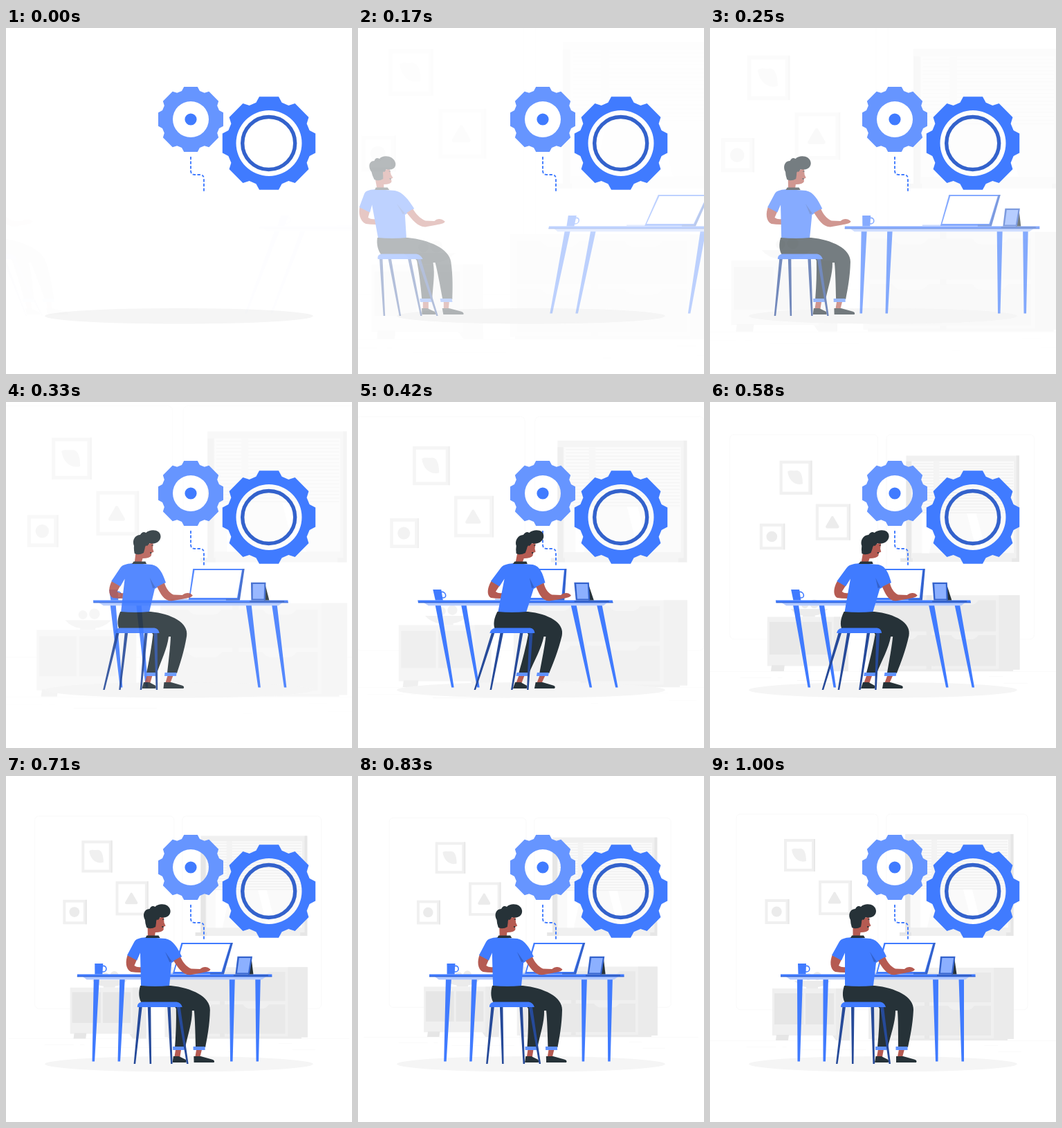
Animation of 500x500 px, one loop 1040 ms. Source, as an HTML page:

```html
<!DOCTYPE html>
<html lang="en">
<head>
<meta charset="utf-8">
<title>Man at a desk</title>
<style>
html, body { margin: 0; width: 100%; height: 100%; overflow: hidden; background: #fff; }
svg { display: block; width: 100%; height: 100%; }
</style>
</head>
<body>
<svg viewBox="0 0 500 500">
  <g id="room" opacity="0">
    <g fill="#ebebeb">
      <path d="M0 382.4h500v.25H0zM416.8 398.5h33.1v.25h-33.1zM322.5 401.2h8.7v.25h-8.7zM396.6 389.2h19.2v.25h-19.2zM52.5 390.9h43.2v.25H52.5zM104.6 390.9h6.3v.25h-6.3zM131.5 395.1h93.7v.25h-93.7z"/>
    </g>
    <g fill="none" stroke="#ebebeb" stroke-width=".3">
      <rect x="38.2" y="55" width="204.5" height="282.8" rx="5.7"/>
      <rect x="254.8" y="55" width="204.2" height="282.8" rx="5.7"/>
    </g>
    <g id="pictures"></g>
    <g fill="#ebebeb">
      <path d="M130 105c8-1 9 10 8 19-10 2-19-6-19-19 4-2 8 0 11 0z" transform="rotate(-6 129 114)" fill="#f0f0f0"/>
      <path d="M178.500 168.500q1.500-2 3 0l7.500 13q1 3-2 3h-14q-3 0-2-3z"/>
      <circle cx="96.300" cy="196" r="7.500"/>
    </g>

    <path fill="#f0f0f0" d="M282 84h156.500v147H282z"/>
    <path fill="#e6e6e6" d="M434.500 84h4v147h-4zM282 92h7v134h-7zM274 226h17v5h-17zM428 226h10.500v5H428z"/>
    <path fill="#fafafa" d="M290 92h141v127H290z"/>
    <path fill="#fff" d="M366 164h13l14 55h-13zM304 164h22l-12 55h-10z"/>
    <g id="blinds" stroke="#f0f0f0" stroke-width="1.300"></g>
    <path fill="#f3f3f3" d="M320 92h8v72h-8z"/>

    <path fill="#f0f0f0" d="M229 277h210v103H229z"/>
    <path fill="#ebebeb" d="M410 277h29v103h-29zM234 379h196v3H234z"/>
    <path fill="#e8e8e8" d="M310 277h7v103h-7z"/>
    <g id="drawers"></g>

    <path fill="#f0f0f0" d="M90 307h112v68H90z"/>
    <path fill="#ebebeb" d="M182 307h20v75h-20zM177 375h5v7z"/>
    <path fill="#e6e6e6" d="M93 314h42v45H93zM138 314h41v45h-41zM96 374h18l-1 8H95z"/>
    <g fill="#ebebeb">
      <circle cx="142" cy="290" r="5"/><circle cx="155" cy="289" r="6"/>
      <path d="M122 296h52q-8 8-18 9v2h-17v-2q-10-1-17-9z"/>
    </g>
  </g>

  <ellipse cx="250" cy="416.240" rx="193.900" ry="11.300" fill="#f5f5f5"/>

  <g fill-rule="evenodd">
    <path id="smallGear" fill="#6695ff" transform="translate(267 132)"/>
    <circle cx="267" cy="132" r="8.600" fill="#407bff"/>
    <path id="bigGear" fill="#407bff" transform="translate(380 166.500) scale(1.430)"/>
    <circle cx="379.700" cy="166.500" r="38" fill="none" stroke="#3362cc" stroke-width="5.400"/>
  </g>
  <path d="M267 186v20q0 6 6 6h7q6 0 6 6v18" fill="none" stroke="#407bff" stroke-width="1.900" stroke-dasharray="4.200 2.400"/>

  <g id="desk" fill="#407bff" opacity="0">
    <path d="M126 293h8l-4 119.500h-3.500zM163.500 293h7.500l-4 119.500h-3.500zM322 293h8l-.5 119.500H326zM359.500 293h7.500v119.500h-3.500z"/>
    <path fill="#b3caff" d="M110 290h265l-6 4.300H116z"/>
    <path d="M102 286.500h281.500v3.800H102z"/>
    <path fill="#3362cc" d="M102 289.300h281.500v1H102zM328 287h50v3h-50z"/>
    <path d="M127 271h12l-.5 15.500h-11z"/>
    <circle cx="139.500" cy="278.700" r="4.300" fill="none" stroke="#407bff" stroke-width="1.600"/>
    <path fill="#a6c1ff" d="M214 284.600h82v1.900h-82z"/>
    <path d="M251.500 241H324l-12 45h-72z"/>
    <path fill="#3362cc" d="M323 241h3l-12 45.500h-20v-2h17z"/>
    <path fill="#fff" d="M253.500 243H322l-11.500 40h-68z"/>
    <path fill="#263238" d="M353 262l3.500 24.500H349z"/>
    <path fill="#3362cc" d="M333 260.800h21.500l-3.500 25.700h-20.500z"/>
    <path fill="#8cb0ff" d="M335.500 263h16.500l-3 21.500h-16z"/>
  </g>

  <g id="man" opacity="0">
    <g fill="#b55b52">
      <path d="M177 258c-4 9-4 21 4 25q6 1 15 1v-8q-6 1-10-2l5-11z"/>
      <path d="M243 395h8l-2 11h-8zM273 395h8l-3 11h-7z"/>
      <path d="M217 207l13-4 .5 9 2 4.500-3 1.500v4q-2 4-12 4l-1 6h-10v-15z"/>
    </g>
    <path fill="#263238" d="M205 219q-2-6-2-11c-4-7-1-16 7-16q3-6 8-3c6-6 21-5 22 6 0 8-8 11-15 9l-3 4q-3-2-3 4l-1 6q-5 3-10 2zM228 207l2.500-.8v1.300l-2 .6zM227 217l2.500 0-.4 2h-1.500z"/>
    <path fill="#263238" d="M194 303h44c30 3 57 16 56 35-1 22-5 40-8 54h-14c0-23 0-39-1-53h-3c0 17-7 35-11 53h-15q3-30 3-56-3-5-9-6l-40-1c-5-7-5-17-2-26z"/>
    <path fill="#407bff" d="M204 233c-10 1-15 2-18 8l-10 18 14 7.500 5-11v47.500q20 2 41 0l4-33 15-9c-6-13-12-24-23-26z"/>
    <path fill="#263238" d="M205 230.500h17l2 3.500h-21z"/>
    <path fill="#3362cc" d="M231 254l9.500 14-3.500 1z"/>
    <path fill="#b55b52" d="M243 267c6 10 12 20 23 20.500l17-3c5-1 12-2 13-5-5-5-11-4-15-.5l-13-.5c-7-3-12-10-15-17z"/>
    <path fill="#5f91ff" d="M239 391h17l-.5 5H239zM268.500 391h17v5h-17z"/>
    <path fill="#263238" d="M238 414l1.500-9h8l10 5q1.500 4-.5 4zM269 414v-9h10l16 4.500q5 1.500 3 4.500z"/>
    <path fill="#264a99" d="M191.500 333h4.500l-11.500 83h-2.500zM204 333h4.500l-1 83h-2.500zM232.500 333h4.500l1 83h-2.500zM246 333h5l10 83h-2.500z"/>
    <path fill="#407bff" d="M189 334q0-7 7-7.500h50q6 .5 8 7.500z"/>
  </g>
</svg>
<script>
const $ = id => document.getElementById(id);
const rect = (x, y, w, h, fill) => `<rect x="${x}" y="${y}" width="${w}" height="${h}" fill="${fill}"/>`;

$('pictures').innerHTML = [[107, 91, 45, 47], [157, 151, 48, 50], [79.5, 178, 35, 36]]
  .map(([x, y, w, h]) => rect(x, y, w, h, '#f0f0f0') + rect(x + w - 2, y, 2, h, '#e8e8e8') +
    rect(x + 4, y + 4, w - 9, h - 8, '#fff')).join('');

$('blinds').innerHTML = Array.from({ length: 18 },
  (_, i) => `<path d="M292 ${95 + i * 4}H430"/>`).join('');

$('drawers').innerHTML = [[236, 284], [320, 284], [236, 332], [320, 332]]
  .map(([x, y]) => `<path fill="#e9e9e9" d="M${x} ${y}h24q4 6 10 6h18q6 0 10-6h24v43h-86z"/>`).join('');

// Eight flat teeth around a round hole
function gear(hole) {
  const points = [];
  for (let i = 0; i < 8; i++) {
    const c = Math.cos(i * Math.PI / 4), s = Math.sin(i * Math.PI / 4);
    for (const [x, y] of [[-13, -41], [-9.8, -47], [9.8, -47], [13, -41]])
      points.push(`${x * c - y * s} ${x * s + y * c}`);
  }
  const arc = `a${hole} ${hole} 0 1 0 `;
  return `M${points.join('L')}ZM${-hole} 0${arc}${2 * hole} 0${arc}${-2 * hole} 0Z`;
}
$('smallGear').setAttribute('d', gear(26));
$('bigGear').setAttribute('d', gear(33.2));

// cubic-bezier(.36, -.01, .5, 1.38)
function ease(x) {
  if (x <= 0 || x >= 1) return x <= 0 ? 0 : 1;
  const curve = (s, a, b) => 3 * (1 - s) ** 2 * s * a + 3 * (1 - s) * s * s * b + s ** 3;
  let lo = 0, hi = 1;
  for (let i = 0; i < 30; i++) {
    const mid = (lo + hi) / 2;
    if (curve(mid, .36, .5) < x) lo = mid; else hi = mid;
  }
  return curve(lo, -.01, 1.38);
}

function show(id, transform, opacity) {
  $(id).setAttribute('transform', transform);
  $(id).setAttribute('opacity', Math.max(0, Math.min(1, opacity)));
}

const stops = [0, .6, .8, 1];
const slants = [20, -10, 2, 0].map(deg => Math.tan(deg * Math.PI / 180));

// Slide in from one side (-1 left, 1 right), slanting about height cy
function slideIn(id, p, side, cy) {
  const i = p < .6 ? 0 : p < .8 ? 1 : 2;
  const k = ease((p - stops[i]) / (stops[i + 1] - stops[i]));
  const slant = -side * (slants[i] + (slants[i + 1] - slants[i]) * k);
  const shift = i ? 0 : side * 250 * (1 - k);
  show(id, `matrix(1 0 ${slant} 1 ${shift - slant * cy} 0)`, i ? 1 : k);
}

function draw() {
  // Motion steps at 24 frames per second
  const step = Math.floor(performance.now() % 1040 * .024 + .1);
  const p = Math.min(1, step / 24 + 1 / 60);
  const k = ease(p);
  show('room', `translate(250 229) scale(${1.5 - k / 2}) translate(-250 -229)`, k);
  slideIn('desk', p, 1, 327);
  slideIn('man', p, -1, 300.5);
  requestAnimationFrame(draw);
}
draw();
</script>
</body>
</html>
```
